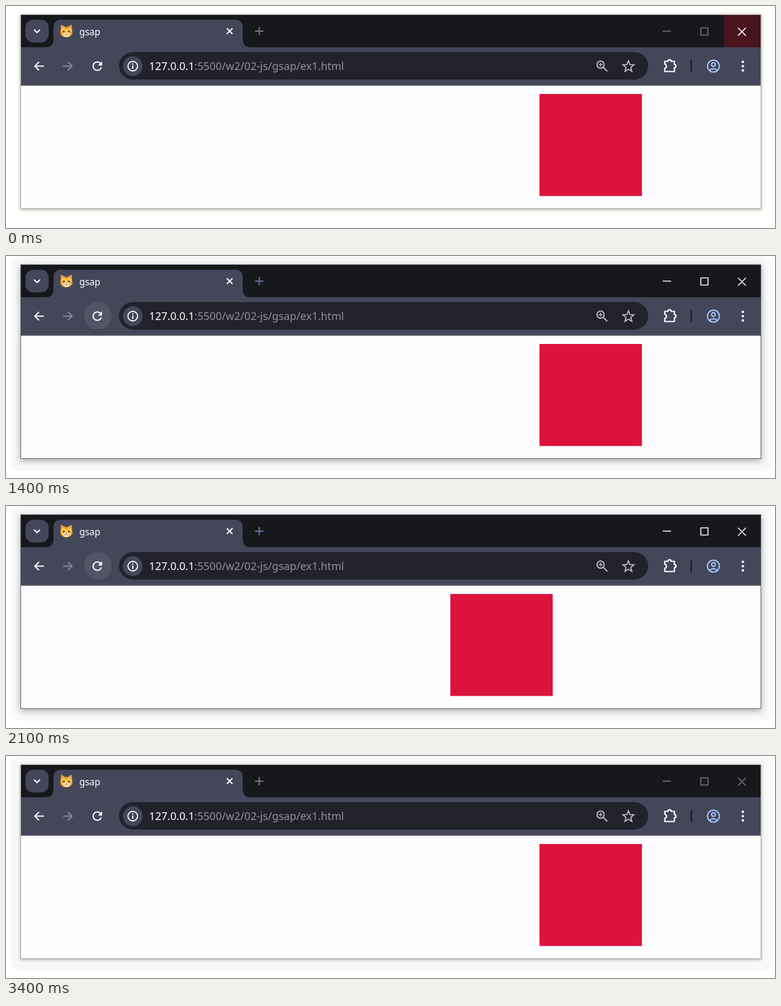
An HTML page that plays this animation: 1280x371 px, repeating every 3500 ms.

```html
<!DOCTYPE html>
<html lang="en">
<head>
<meta charset="utf-8">
<title>gsap</title>
<style>
  html, body { margin: 0; width: 100%; height: 100%; overflow: hidden; background: #fff; }
  #stage { position: absolute; width: 1280px; height: 371px; overflow: hidden; }
  #stage > * { position: absolute; }
  #halo { inset: 9px 18px 25px; border-radius: 8px; background: #fdfdf6; }
  #halo.wide { inset: 0 4px 12px 8px; border-radius: 16px; background: #f8f8f8; }
  #frame {
    left: 24px; top: 14px; width: 1231px; height: 323px;
    border: 1px solid #acacae; background: #fefefe;
    box-shadow: 0 1px 5px rgba(0, 0, 0, .36);
  }
  svg { left: 0; top: 0; --control: #78797c; --plus: #78797c; }
  .focused #frame { border-color: #62636c; box-shadow: 0 3px 10px rgba(0, 0, 0, .33); }
  .focused svg { --control: #fff; --plus: #6272a4; }
  .line { fill: none; stroke: #fff; stroke-width: 2; }
  .round { stroke-linejoin: round; stroke-linecap: round; }
  .control { stroke: var(--control); stroke-width: 1.6; }
  .muted { stroke: #bcbcc2; }
  text { font-family: "Noto Sans", "Open Sans", sans-serif; fill: #fff; }
</style>
</head>
<body>
<div id="stage">
  <div id="halo"></div>
  <div id="frame"></div>
  <svg width="1280" height="371" viewBox="0 0 1280 371">
    <!-- title bar and tab -->
    <path fill="#17181c" d="M25 15H1256V69H25Z"/>
    <path fill="#44475a" d="M25 69H1256V132H25Z"/>
    <path fill="#686a7b" d="M25 131H1256V132H25Z"/>
    <path fill="#22232c" d="M25 132H1256V133H25Z"/>
    <rect x="32.5" y="23" width="38.5" height="38" rx="13" fill="#44475a"/>
    <path class="line" d="M46.7 39.5L51.7 44.3L56.7 39.5"/>
    <path fill="#44475a" d="M65 69Q79 69 79 55V36Q79 23 92 23H381Q394 23 394 36V55Q394 69 408 69Z"/>

    <g id="cat">
      <path fill="#f3a72e" d="M91 43L91.5 32Q92 31 93.5 32L98 35H103L107.500 32Q109 31 109.500 32L110 43Z"/>
      <path fill="#e88d76" d="M93 38V34L96.500 36.500ZM108 38V34L104.500 36.500Z"/>
      <ellipse cx="100.500" cy="43.500" rx="10" ry="8.800" fill="#fcc644"/>
      <path stroke="#d98325" stroke-width="1.300" d="M98.500 35V38M100.500 35V39M102.500 35V38M90 44L94 44.500M90.500 48L94 47M111 44L107 44.500M110.500 48L107 47"/>
      <ellipse cx="100.500" cy="47.800" rx="4.600" ry="3.400" fill="#fff0cf"/>
      <circle cx="96.200" cy="42.500" r="1.600" fill="#4b3527"/>
      <circle cx="104.800" cy="42.500" r="1.600" fill="#4b3527"/>
      <path fill="#d6586b" d="M99 45H102L100.500 47Z"/>
      <path class="line round" style="stroke:#7a5034;stroke-width:.9" d="M97.500 48Q99.500 50 100.500 47.500Q101.500 50 103.500 48"/>
    </g>
    <text x="122" y="48.500" font-size="15.400">gsap</text>
    <path class="line" d="M367.500 37.300L377 46.800M377 37.300L367.500 46.800"/>
    <path class="line" style="stroke:var(--plus)" d="M414.500 42H428.500M421.500 35V49"/>

    <!-- window controls -->
    <rect id="closeHover" x="1195" y="15" width="61" height="54" fill="#48151e"/>
    <path class="line control" d="M1093 42H1107M1156.500 36.500H1168.500V48.500H1156.500ZM1218.500 36.500L1231.500 49.500M1231.500 36.500L1218.500 49.500"/>
    <path id="closeLit" class="line" style="stroke-width:1.6" d="M1218.500 36.500L1231.500 49.500M1231.500 36.500L1218.500 49.500"/>

    <!-- navigation -->
    <circle id="reloadHover" cx="153" cy="100" r="23" fill="#fff"/>
    <path class="line" d="M63 100.500H48.500M55 93.500L48 100.500L55 107.500"/>
    <path class="line" style="stroke:#898a96" d="M95 100.500H109.500M103 93.500L110 100.500L103 107.500"/>
    <path fill="#fff" transform="translate(140 88.500)" d="M17.650 6.350A8 8 0 1 0 19.730 14H17.650A6 6 0 1 1 16.220 7.780L13 11H20V4Z"/>

    <!-- address bar -->
    <rect x="188" y="77" width="881" height="46" rx="23" fill="#22222c"/>
    <rect id="barHover" x="188" y="77" width="881" height="46" rx="23" fill="#2b2b35"/>
    <circle cx="211" cy="100.500" r="16.500" fill="#44475a"/>
    <circle class="line" style="stroke-width:1.8" cx="211" cy="100.500" r="8"/>
    <path class="line" d="M211 96V98M211 99.500V105"/>
    <text x="238" y="107" font-size="17.850">127.0.0.1<tspan fill="#909197">:5500/w2/02-js/gsap/ex1.html</tspan></text>
    <g class="line muted">
      <circle cx="989.700" cy="98" r="5.900"/>
      <path d="M994 102.300L1001 109.200"/>
      <path stroke-width="1.600" d="M986.500 98H993M989.700 94.800V101.200"/>
      <path id="star" stroke-width="1.900"/>
    </g>

    <!-- toolbar buttons -->
    <path class="line round" style="stroke-width:2.2" d="M1096.500 92.500H1101.800A2.700 2.700 0 0 1 1107.200 92.500H1112.500V97.800A2.700 2.700 0 0 1 1112.500 103.200V109.500H1096.500V104.300A3.600 3.600 0 0 0 1096.500 97.300Z"/>
    <path class="line" style="stroke:#1c1d25;stroke-width:2.4" d="M1140.600 90V110.500"/>
    <g class="line" style="stroke:#a8c7fa">
      <circle cx="1177.500" cy="100.500" r="9.900"/>
      <circle cx="1177.500" cy="97.800" r="3.100"/>
      <path d="M1171 107.500Q1177.500 102.300 1184 107.500"/>
    </g>
    <g fill="#fff">
      <circle cx="1226.500" cy="93.300" r="2.100"/>
      <circle cx="1226.500" cy="100.500" r="2.100"/>
      <circle cx="1226.500" cy="107.700" r="2.100"/>
    </g>

    <rect id="box" y="147" width="170.500" height="170.500" fill="#dc143c"/>
  </svg>
</div>
<script>
const LOOP = 3500, STEP = 100;
const CLICK = 1000, RELOAD = 1600, BLUR = 3400;
const REST_X = 888, START_X = 470, TWEEN_END = 2843, SPEED = 0.0164;

const closeKeys = [[0, 1], [300, 0]];
const barKeys = [[0, 0], [300, 1], [500, 1], [700, 0], [2200, 0], [2400, 1], [2500, 1], [2700, 0]];
const reloadKeys = [[500, 0], [700, 1], [900, 1], [1000, 1.6], [1400, 1], [2100, 1], [2400, 0]];

const el = id => document.getElementById(id);
const setOpacity = (id, value) => el(id).setAttribute("opacity", value);

// Linear interpolation between [time, value] keys, held at both ends.
function ramp(keys, t) {
  const next = keys.findIndex(([time]) => time > t);
  if (next < 0) return keys[keys.length - 1][1];
  if (next === 0) return keys[0][1];
  const [t0, v0] = keys[next - 1], [t1, v1] = keys[next];
  return v0 + (v1 - v0) * (t - t0) / (t1 - t0);
}

// Quadratic ease-out after the page reloads.
function boxX(t) {
  if (t < RELOAD || t >= TWEEN_END) return REST_X;
  if (t < RELOAD + STEP) return START_X;
  return REST_X - (SPEED * (TWEEN_END - t)) ** 2;
}

function starPath() {
  const points = Array.from({ length: 10 }, (_, i) => {
    const radius = i % 2 ? 4.2 : 9.6, angle = (i / 5 - 0.5) * Math.PI;
    return [1036 + radius * Math.cos(angle), 101.3 + radius * Math.sin(angle)];
  });
  return `M${points.join("L")}Z`;
}

function render(t) {
  const closeHover = ramp(closeKeys, t);
  el("stage").classList.toggle("focused", t >= CLICK && t < BLUR);
  el("halo").classList.toggle("wide", t >= CLICK);
  setOpacity("closeHover", closeHover);
  setOpacity("closeLit", closeHover);
  setOpacity("barHover", ramp(barKeys, t));
  setOpacity("reloadHover", 0.08 * ramp(reloadKeys, t));
  el("box").setAttribute("x", boxX(t));
}

function tick() {
  render(Math.floor(performance.now() % LOOP / STEP) * STEP);
  requestAnimationFrame(tick);
}

el("star").setAttribute("d", starPath());
tick();
</script>
</body>
</html>
```
